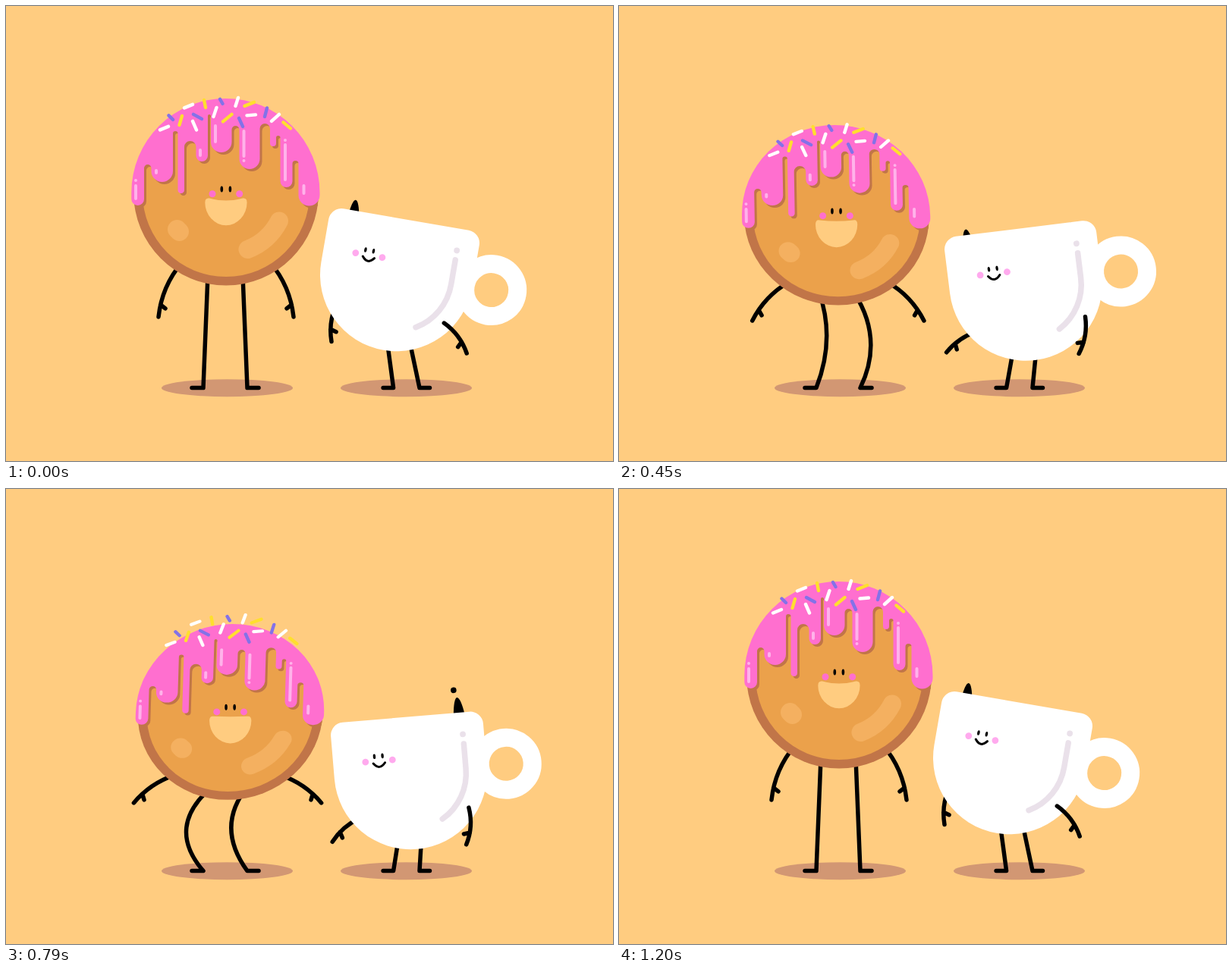
An HTML page that plays this animation: 800 px wide and 600 px high, repeating every 1.25 s.

```html
<!DOCTYPE html>
<html lang="en">
<head>
<meta charset="utf-8">
<title>Donut and cup</title>
<style>
  html, body { margin: 0; width: 100%; height: 100%; overflow: hidden; background: #ffcc80; }
  svg { display: block; width: 100%; height: 100%; }
  .limb { fill: none; stroke: #000; stroke-width: 5.5; stroke-linecap: round; stroke-linejoin: round; }
  .line { fill: none; stroke-linecap: round; }
  .pink { fill: #ff6fcf; }
  .crust { fill: #c17548; }
</style>
</head>
<body>
<svg viewBox="0 0 800 600">
  <defs>
    <clipPath id="dough"><circle cx="290" cy="246.7" r="121.8"/></clipPath>
    <path id="drop" d="M-7 0C-6-10-4-20-.8-20S5.5-10 7 0V14H-7Z"/>
  </defs>
  <g fill="#d29773">
    <ellipse cx="291.5" cy="503.7" rx="86.5" ry="11.5"/>
    <ellipse cx="527.5" cy="503.7" rx="86.5" ry="11.5"/>
  </g>

  <path id="donutLimbs" class="limb"/>
  <g id="donut">
    <circle class="crust" cx="290" cy="246.7" r="121.8"/>
    <circle fill="#eba14b" cx="290" cy="247" r="110"/>
    <g class="line" stroke="#f4b060">
      <path stroke-width="25" d="M225.5 294.5l3 3"/>
      <path stroke-width="24" d="M318.5 321A79 79 0 0 0 360 283.5"/>
    </g>
    <g clip-path="url(#dough)"><path id="glazeShade" class="crust" transform="translate(3 3)"/></g>
    <path id="glaze" class="pink"/>
    <path class="line" stroke="#ffb3ea" stroke-width="4" d="M171 230h0M171 237v17M198 217v3M256 190v7M276 158v21M313.5 165v33M313.5 204h0M368 177h0M368 183v46M392.5 237v10"/>
    <g id="sprinkles" class="line" stroke-width="4.4">
      <path stroke="#fff" d="M203 163.5l11-4.5M235 134.5l11-4.5M246 152l5 11.5M277.500 134l-4 12M306 121l-3.500 11M317.500 144.500l11.500-1M360 143l-10 9"/>
      <path stroke="#8372e8" d="M214.500 144.500l5.500 5.500M247 143l11 6M282 123l3.500 6M307 148l5 11M344 134.500l-3 11.500"/>
      <path stroke="#ffdf2e" d="M232 145l-3.500 12M261 124l2 10M297.500 143l-11.500 9.500M314.500 132l12.500-5M365.500 153.500l9.500 8"/>
    </g>
  </g>
  <g id="donutFace">
    <ellipse cx="284.3" cy="241.6" rx="1.8" ry="4"/>
    <ellipse cx="295.4" cy="241.6" rx="1.8" ry="4"/>
    <circle class="pink" cx="272" cy="247.7" r="4.5"/>
    <circle class="pink" cx="307.7" cy="247.7" r="4.5"/>
    <path id="mouth" fill="#ffcc80"/>
  </g>

  <path id="cupLimbs" class="limb"/>
  <g id="cup">
    <use id="dropL" href="#drop"/>
    <use id="dropR" href="#drop"/>
    <circle id="dotL" r="3.8"/>
    <circle id="dotR" r="3.8"/>
    <circle cx="126.5" cy="-1.5" r="34.5" fill="none" stroke="#fff" stroke-width="24"/>
    <path fill="#fff" d="M-100.75 0V-57a17 17 0 0 1 17-17H83.75a17 17 0 0 1 17 17V0A100.75 100.75 0 0 1-100.75 0Z"/>
    <circle cx="72.8" cy="-45.1" r="3.9" fill="#eae1ea"/>
    <path class="line" stroke="#eae1ea" stroke-width="7.5" d="M73-32.5V0A73.5 73.5 0 0 1 36.7 63.9"/>
    <ellipse cx="-45.9" cy="-25.6" rx="1.7" ry="3.3"/>
    <ellipse cx="-35.2" cy="-25.6" rx="1.7" ry="3.3"/>
    <circle cx="-58.1" cy="-19.3" r="4.4" fill="#ffaaee"/>
    <circle cx="-22.5" cy="-19.3" r="4.4" fill="#ffaaee"/>
    <path class="line" stroke="#000" stroke-width="3" d="M-48-16.500Q-40.300-6.500-32.500-16.500"/>
  </g>
  <path id="cupArm" class="limb"/>
</svg>

<script>
const LOOP = 1250, REST = 1200, MID = 590, FLOOR = 503.6;
const el = id => document.getElementById(id);
const set = (id, name, value) => el(id).setAttribute(name, value);
const move = (id, x, y) => set(id, 'transform', `translate(${x} ${y})`);

// Drips as [left, right, bottom, top of the gap before it]
const drips = [
  [165.3, 182, 263], [191.5, 220, 232, 209], [226.5, 235, 247, 165],
  [250.5, 266, 205, 178], [270, 297.5, 193, 143], [307.5, 334.5, 215, 158],
  [348, 356, 185, 155], [361.5, 377.5, 239, 171], [385.5, 413.5, 263.5, 204]
];

function glazePath() {
  let d = 'M165.3 246A124.1 124.1 0 0 1 413.5 246';
  for (let i = drips.length - 1; i >= 0; i--) {
    const [left, right, bottom, top] = drips[i];
    const r = (right - left) / 2;
    d += `V${bottom - r}A${r} ${r} 0 0 1 ${left} ${bottom - r}`;
    if (i) {
      const prev = drips[i - 1][1], g = (left - prev) / 2;
      d += `V${top + g}A${g} ${g} 0 0 0 ${prev} ${top + g}`;
    }
  }
  return d + 'Z';
}

// Eased value between [time, value] keys
function track(t, keys) {
  let i = 1;
  while (i < keys.length - 1 && t > keys[i][0]) i++;
  const [t0, a] = keys[i - 1], [t1, b] = keys[i];
  const x = Math.min(1, Math.max(0, (t - t0) / (t1 - t0)));
  return a + (b - a) * x * x * (3 - 2 * x);
}

// Curved arm with a thumb; side is 1 for left, -1 for right
function arm(sx, sy, hx, hy, side, bulge) {
  const dx = hx - sx, dy = hy - sy, len = Math.hypot(dx, dy);
  const cx = (sx + hx) / 2 - side * bulge * dy / len;
  const cy = (sy + hy) / 2 + side * bulge * dx / len;
  const u = 1 - 16 / len, v = 1 - u;
  const px = v * v * sx + 2 * u * v * cx + u * u * hx;
  const py = v * v * sy + 2 * u * v * cy + u * u * hy;
  const n = Math.hypot(hx - px, hy - py), ex = (hx - px) / n, ey = (hy - py) / n;
  const tx = px + 4 * ex + 7 * side * ey, ty = py + 4 * ey - 7 * side * ex;
  return `M${sx} ${sy}Q${cx} ${cy} ${hx} ${hy}M${px} ${py}L${tx} ${ty}`;
}

const leg = (hx, hy, cx, cy, ax, foot) =>
  `M${hx} ${hy}Q${cx} ${cy} ${ax} ${FLOOR}h${foot}`;

function drawDonut(t, dip) {
  const first = t < MID;
  const lean = (first ? -6.5 : 7.5) * dip ** 0.85;
  const squash = 1 - 0.082 * dip;
  set('donut', 'transform',
    `matrix(1 0 ${-0.005 * lean} ${squash} ${2.21 * lean} ${86.6 * dip})`);

  const hop = (first ? t : t - MID) / 430;
  move('sprinkles', 0, -Math.max(0, 44.8 * hop * (1 - hop)) / squash);

  move('donutFace', lean, 63 * dip);
  const lip = 259.5 - 7 * dip;
  set('mouth', 'd', `M262.3 259Q262.5 252.500 268 253.600Q290 ${lip} 312 253.600` +
    'Q317.5 252.500 317.600 259A27.650 30.200 0 0 1 262.300 259Z');

  const hip = lean * (first ? 0.65 : 1.2), hipY = 355 + 50 * dip, kneeY = 430 + 20 * dip;
  const [bendL, bendR] = first ? [51, 77] : [-78, -59];
  const xl = 266 + hip, xr = 312 + hip;
  let d = leg(xl, hipY, (xl + 260) / 2 + bendL * dip, kneeY, 260, -15) +
          leg(xr, hipY, (xr + 318) / 2 + bendR * dip, kneeY, 318, 15);

  const mid = 290 + 0.35 * lean;
  const shoulder = 58 + 16.5 * dip, shoulderY = 338 + 64 * dip - 14 * dip * dip;
  const hand = 89 + 61.3 * dip - 19.2 * dip * dip, handY = 410 + 20 * dip * (1 - dip);
  for (const side of [1, -1])
    d += arm(mid - side * shoulder, shoulderY, mid - side * hand, handY, side, 12 - 4 * dip);
  set('donutLimbs', 'd', d);
}

function drawCup(t, dip) {
  const tilt = track(t, [[0, 1], [MID, -1], [REST, 1]]);
  const deg = 9.8 * tilt, rad = deg * Math.PI / 180;
  const cx = 527.2 - 1.27 * deg, cy = 354.5 + 27.2 * dip;
  set('cup', 'transform', `translate(${cx} ${cy}) rotate(${deg})`);

  const splash = (side, x, dotX, peak) => {
    let dt = t - peak;
    if (dt > REST / 2) dt -= REST;
    move('drop' + side, x, -74 + 20 * Math.min(2, (dt / 337) ** 2));
    move('dot' + side, dotX, -104 + Math.min(60, 9.5e-4 * dt * dt));
  };
  splash('L', -69, -67, 185);
  splash('R', 70, 65.5, 790);

  const cos = Math.cos(rad), sin = Math.sin(rad);
  const at = (x, y) => [cx + x * cos - y * sin, cy + x * sin + y * cos];
  const back = Math.min(0, tilt) ** 2;
  const hipY = 447 + 27 * dip;
  const straight = (x, ax, foot) => leg(x, hipY, (x + ax) / 2, (hipY + FLOOR) / 2, ax, foot);
  set('cupLimbs', 'd',
    straight(512 - 9 * tilt, 510.6, -13.5) + straight(542.5 - 9.5 * tilt, 545, 13.5) +
    arm(...at(-72, 54), 429 + 5 * back, 442.5 + 31 * dip, 1, 7));
  set('cupArm', 'd',
    arm(...at(72.5, 52), 607.2 - 2 * back, 450 + 8 * tilt + 31 * dip, -1, 8));
}

function draw(now) {
  const t = Math.min(now % LOOP, REST);
  const dip = track(t, [[0, 0], [296, 1], [MID, 0], [894, 1], [REST, 0]]);
  drawDonut(t, dip);
  drawCup(t, dip);
  requestAnimationFrame(draw);
}

const glaze = glazePath();
set('glaze', 'd', glaze);
set('glazeShade', 'd', glaze);
draw(0);
</script>
</body>
</html>
```
